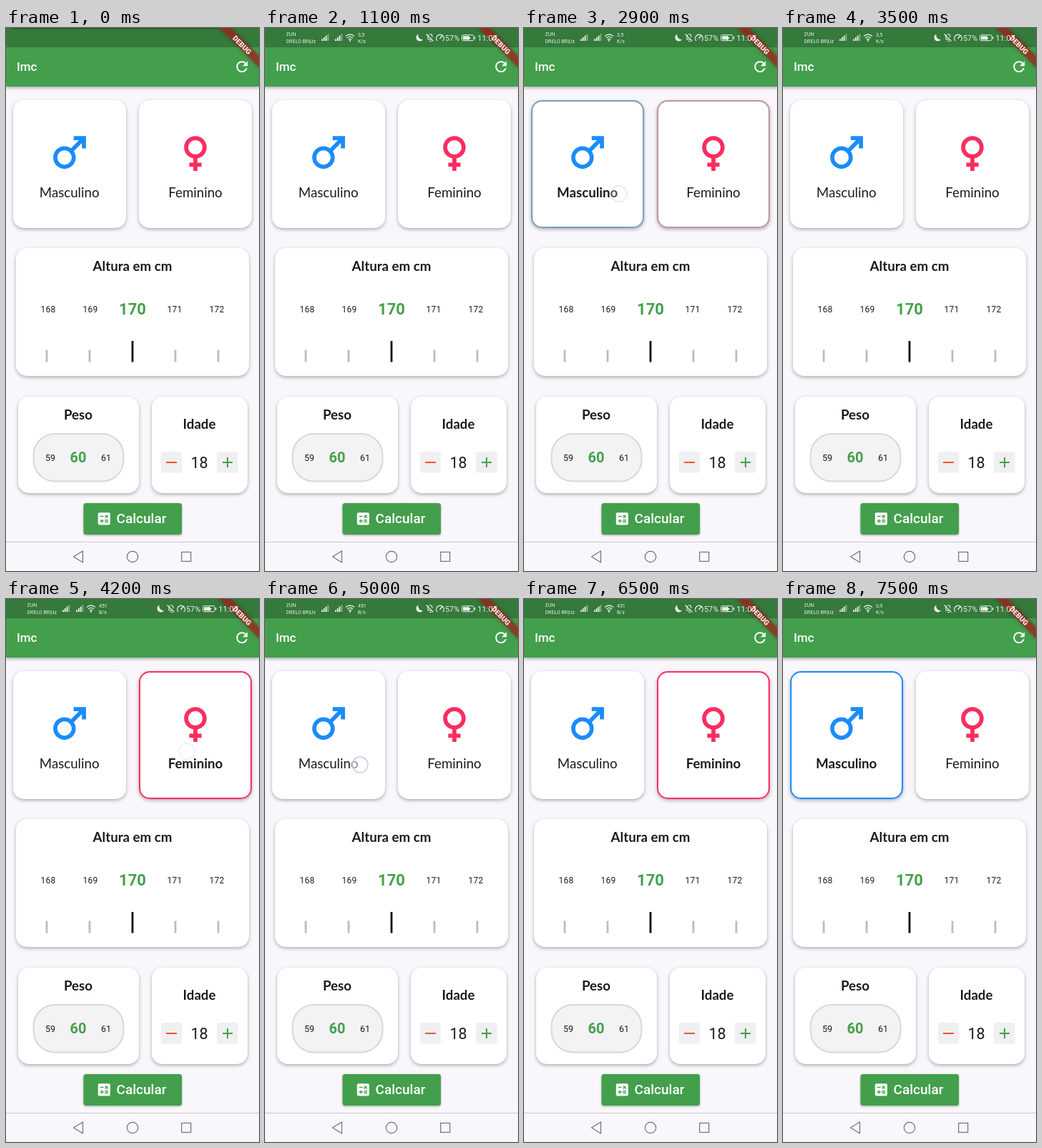
These frames come from a looping animation (354x760 px, 8 s). An HTML page:

```html
<!DOCTYPE html>
<html lang="pt-BR">
<head>
<meta charset="utf-8">
<title>Imc</title>
<style>
html, body { margin: 0; width: 100%; height: 100%; overflow: hidden; background: #f9f7fb; }
svg { display: block; width: 354px; height: 760px; font-family: Roboto, sans-serif; }
.card { fill: #fff; filter: drop-shadow(0 2.5px 2.5px rgba(0,0,0,.3)); }
.label { font: 18.7px Lato, sans-serif; fill: #1b1b1e; text-anchor: middle; }
.bold { font-weight: 700; }
.mid { text-anchor: middle; }
.small { font-size: 12px; letter-spacing: .2px; text-anchor: middle; fill: #1c1c1e; }
.big { font-weight: 700; fill: #43a04a; text-anchor: middle; }
.tiny { font-size: 7px; }
</style>
</head>
<body>
<svg viewBox="0 0 354 760" xmlns="http://www.w3.org/2000/svg">
  <rect width="354" height="760" fill="#f9f7fb"/>

  <!-- app bar -->
  <rect width="354" height="82" fill="#439f4c" style="filter:drop-shadow(0 2px 2px rgba(0,0,0,.3))"/>
  <rect width="354" height="27" fill="#35793b"/>
  <text x="15" y="60" font-size="17" font-weight="500" fill="#fff">Imc</text>
  <path transform="translate(318.4 42.4) scale(.983)" fill="#fff" d="M17.65 6.35C16.2 4.9 14.21 4 12 4c-4.42 0-7.99 3.58-7.99 8s3.57 8 7.99 8c3.73 0 6.84-2.55 7.73-6h-2.08c-.82 2.33-3.04 4-5.65 4-3.31 0-6-2.69-6-6s2.69-6 6-6c1.66 0 3.14.69 4.22 1.78L13 11h7V4l-2.35 2.35z"/>

  <!-- gender cards -->
  <rect class="card" x="10" y="101" width="158" height="179" rx="15"/>
  <rect class="card" x="186" y="101" width="158" height="179" rx="15"/>
  <rect id="edgeM" x="11" y="102" width="156" height="177" rx="14" fill="none" stroke-width="2"/>
  <rect id="edgeF" x="187" y="102" width="156" height="177" rx="14" fill="none" stroke-width="2"/>
  <path transform="translate(54.6 139.8) scale(2.867)" fill="#1a8cfb" d="M9.5 11c1.93 0 3.5 1.57 3.5 3.5S11.43 18 9.5 18 6 16.43 6 14.5 7.57 11 9.5 11zm0-2C6.46 9 4 11.46 4 14.5S6.46 20 9.5 20s5.5-2.46 5.5-5.5c0-1.16-.36-2.23-.97-3.12L18 7.42V10h2V4h-6v2h2.58l-3.97 3.97C11.73 9.36 10.66 9 9.5 9z"/>
  <path transform="translate(230.6 139.8) scale(2.867)" fill="#fb2d60" d="M17.5 9.5C17.5 6.46 15.04 4 12 4S6.5 6.46 6.5 9.5c0 2.7 1.94 4.93 4.5 5.4V17H9v2h2v2h2v-2h2v-2h-2v-2.1c2.56-.47 4.5-2.7 4.5-5.4zm-9 0C8.5 7.57 10.07 6 12 6s3.5 1.57 3.5 3.5S13.93 13 12 13s-3.5-1.57-3.5-3.5z"/>
  <text id="nameM" class="label" x="88.7" y="237">Masculino</text>
  <text id="nameF" class="label" x="265" y="237">Feminino</text>

  <!-- height -->
  <rect class="card" x="14" y="308" width="326" height="179" rx="15"/>
  <text class="label bold" x="177" y="340">Altura em cm</text>
  <g id="ruler"></g>
  <text class="big" x="177" y="401" font-size="22">170</text>

  <!-- weight -->
  <rect class="card" x="17" y="516" width="169" height="135" rx="15"/>
  <text class="label bold" x="101" y="547.5">Peso</text>
  <rect x="38.5" y="568" width="126" height="66.500" rx="30" fill="#f3f2f5" stroke="#d8d7da" stroke-width="2"/>
  <text class="mid" x="62" y="606" font-size="12.5" fill="#1c1c1e">59</text>
  <text class="big" x="101" y="608" font-size="20">60</text>
  <text class="mid" x="140" y="606" font-size="12.5" fill="#1c1c1e">61</text>

  <!-- age -->
  <rect class="card" x="204" y="516" width="134" height="135" rx="15"/>
  <text class="label bold" x="270.5" y="561">Idade</text>
  <rect x="217" y="593" width="29" height="29.500" rx="3" fill="#f0eff2"/>
  <rect x="295" y="593" width="29.500" height="29.500" rx="3" fill="#f0eff2"/>
  <path d="M224 608h15" stroke="#f4512f" stroke-width="2"/>
  <path d="M303 608h14M310 601v14" stroke="#43a04a" stroke-width="2"/>
  <text class="mid" x="270.5" y="615.5" font-size="21.500" fill="#1c1c1e">18</text>

  <!-- action button -->
  <rect x="108.500" y="665" width="137.500" height="44" rx="3.500" fill="#439f4c" style="filter:drop-shadow(0 1.5px 1.5px rgba(0,0,0,.35))"/>
  <path transform="translate(125.900 675.500) scale(.95)" fill="#fff" d="M19 3H5c-1.100 0-2 .9-2 2v14c0 1.100.9 2 2 2h14c1.100 0 2-.9 2-2V5c0-1.100-.9-2-2-2zm-5.970 4.060L14.090 6l1.410 1.410L16.910 6l1.060 1.060-1.410 1.410 1.410 1.410-1.060 1.060-1.410-1.400-1.410 1.410-1.060-1.060 1.410-1.410-1.410-1.420zm-6.780.66h5v1.500h-5v-1.500zM11.500 16h-2v2H8v-2H6v-1.500h2v-2h1.500v2h2V16zm6.500 1.250h-5v-1.500h5v1.500zm0-2.500h-5v-1.500h5v1.500z"/>
  <text class="mid" x="189.500" y="693.300" font-size="19" font-weight="500" fill="#fff">Calcular</text>

  <!-- system navigation -->
  <path d="M0 719.500H354" stroke="#c9c8cb"/>
  <g fill="none" stroke="#727174" stroke-width="1.200">
    <path d="M107.500 732v16L94.500 740z" stroke-linejoin="round"/>
    <circle cx="177" cy="740" r="7.700"/>
    <rect x="245.700" y="733.500" width="13" height="13"/>
  </g>

  <!-- debug ribbon -->
  <g transform="translate(354 0) rotate(45)">
    <rect x="-42" y="27.500" width="84" height="11.800" fill="#b71c1c" fill-opacity=".63" style="filter:drop-shadow(0 0 3px rgba(0,0,0,.4))"/>
    <text class="mid" x="0" y="37" font-size="10" font-weight="900" fill="#fff" fill-opacity=".92">DEBUG</text>
  </g>

  <!-- system status -->
  <rect id="strip" x="8" width="292" height="1.200" fill="#28502c"/>
  <g id="status" fill="#e8f1e8">
    <text class="tiny" x="29.500" y="10.500">ZUN</text>
    <text class="tiny" x="29.500" y="21">DRELO BR|Uz</text>
    <g id="bars"></g>
    <g fill="none" stroke="#e8f1e8" stroke-width="1.300">
      <path d="M113 11.500q6-5 12 0M115 14q4-3.200 8 0M117 16.300q2-1.600 4 0"/>
      <path d="M229 9.500q-1.500 1.500-1 6.500h6M230 9q4-1.500 4 4M225.500 8.500l10 10" stroke-width="1.100"/>
      <path d="M241 18a5.300 5.300 0 1 1 8 0M244.500 15l3.500-4.500"/>
      <rect x="275.500" y="9.700" width="16.500" height="8" rx="2" stroke-width="1"/>
    </g>
    <circle cx="119" cy="18" r="1.100"/>
    <path d="M214.500 8.500a5.200 5.200 0 1 0 6.500 7.500a6 6 0 0 1-6.500-7.500z"/>
    <path d="M230 18h3v1h-3zM277 11.200h8v5h-8zM293 12h1.200v3.500H293z"/>
    <path d="M285 10l-2.500 4.500h2L284 18l4-5h-2.300z" fill="#fff"/>
    <text id="rate" class="tiny" x="130" y="11.500"></text>
    <text id="unit" class="tiny" x="130" y="20.500"></text>
    <text x="252" y="17.500" font-size="10.800">57%</text>
    <text x="297.300" y="17.500" font-size="11.200">11:07</text>
  </g>

  <circle id="touch" r="11" fill="#fff" fill-opacity=".5" stroke="#cbc6e6" stroke-width="1.300"/>
</svg>
<script>
const LOOP = 8000, FADE = 200;
const $ = id => document.getElementById(id);
const clamp = v => Math.max(0, Math.min(1, v));

// toggles of each card: [time, on]
const cards = {
  M: { rgb: [26, 140, 251], taps: [[1490, 1], [2116, 0], [2790, 1], [3290, 0], [5010, 1], [5412, 0], [6960, 1]] },
  F: { rgb: [251, 45, 96], taps: [[2116, 1], [2790, 0], [3890, 1], [4290, 0], [6200, 1], [6960, 0]] }
};

// finger contacts: [down, up, x, y]
const touches = [
  [1360, 1480, 133, 232], [1860, 2120, 253, 213], [2660, 2780, 133, 232],
  [3160, 3280, 133, 232], [3760, 3880, 253, 213], [4180, 4280, 253, 213],
  [4740, 5010, 133, 232], [5340, 5420, 133, 232], [5960, 6190, 253, 213],
  [6760, 6950, 133, 218]
];

const rates = [[0, "1,2", "K/s"], [1050, "3,5", "K/s"], [4080, "451", "B/s"], [7080, "0,9", "K/s"]];
const latest = (list, t) => list.filter(e => e[0] <= t).pop();

function buildRuler() {
  let out = "";
  [168, 169, 170, 171, 172].forEach((n, i) => {
    const x = 57 + 60 * i, main = n === 170;
    out += `<rect x="${x - 1.4}" y="${main ? 438 : 450.5}" width="2.8" height="${main ? 29.5 : 17}" fill="${main ? "#080808" : "#bcbbbe"}"/>`;
    if (!main) out += `<text class="small" x="${59 + 59 * i}" y="397.700">${n}</text>`;
  });
  $("ruler").innerHTML = out;
}

function buildBars() {
  let out = "";
  for (const x of [79, 98])
    for (let i = 0; i < 4; i++)
      out += `<rect x="${x + i * 2.8}" y="${15.5 - i * 2.4}" width="1.9" height="${2.5 + i * 2.4}" opacity="${i < 3 ? 1 : .45}"/>`;
  $("bars").innerHTML = out;
}

function drawCard(key, t) {
  const { rgb, taps } = cards[key];
  const [start, on] = latest(taps, t) || [-FADE, 0];
  const p = clamp((t - start) / FADE);
  const level = on ? p : 1 - p;
  const color = rgb.map(c => Math.round(c * level));
  $("edge" + key).setAttribute("stroke", `rgba(${color},${level})`);
  $("name" + key).classList.toggle("bold", !!on);
}

function drawTouch(t) {
  const hit = latest(touches, t);
  const shown = hit ? Math.min(clamp((t - hit[0]) / 60), 1 - clamp((t - hit[1]) / 230)) : 0;
  $("touch").setAttribute("opacity", shown);
  if (hit) {
    $("touch").setAttribute("cx", hit[2]);
    $("touch").setAttribute("cy", hit[3]);
  }
}

function draw(t) {
  const seen = clamp((t - 50) / 230);
  $("status").setAttribute("opacity", seen);
  $("strip").setAttribute("opacity", 1 - seen);
  const [, rate, unit] = latest(rates, t);
  $("rate").textContent = rate;
  $("unit").textContent = unit;
  drawCard("M", t);
  drawCard("F", t);
  drawTouch(t);
}

buildRuler();
buildBars();
draw(0);
let origin = null;
function tick(now) {
  if (origin === null) origin = now;
  draw((now - origin) % LOOP);
  requestAnimationFrame(tick);
}
requestAnimationFrame(tick);
</script>
</body>
</html>
```
